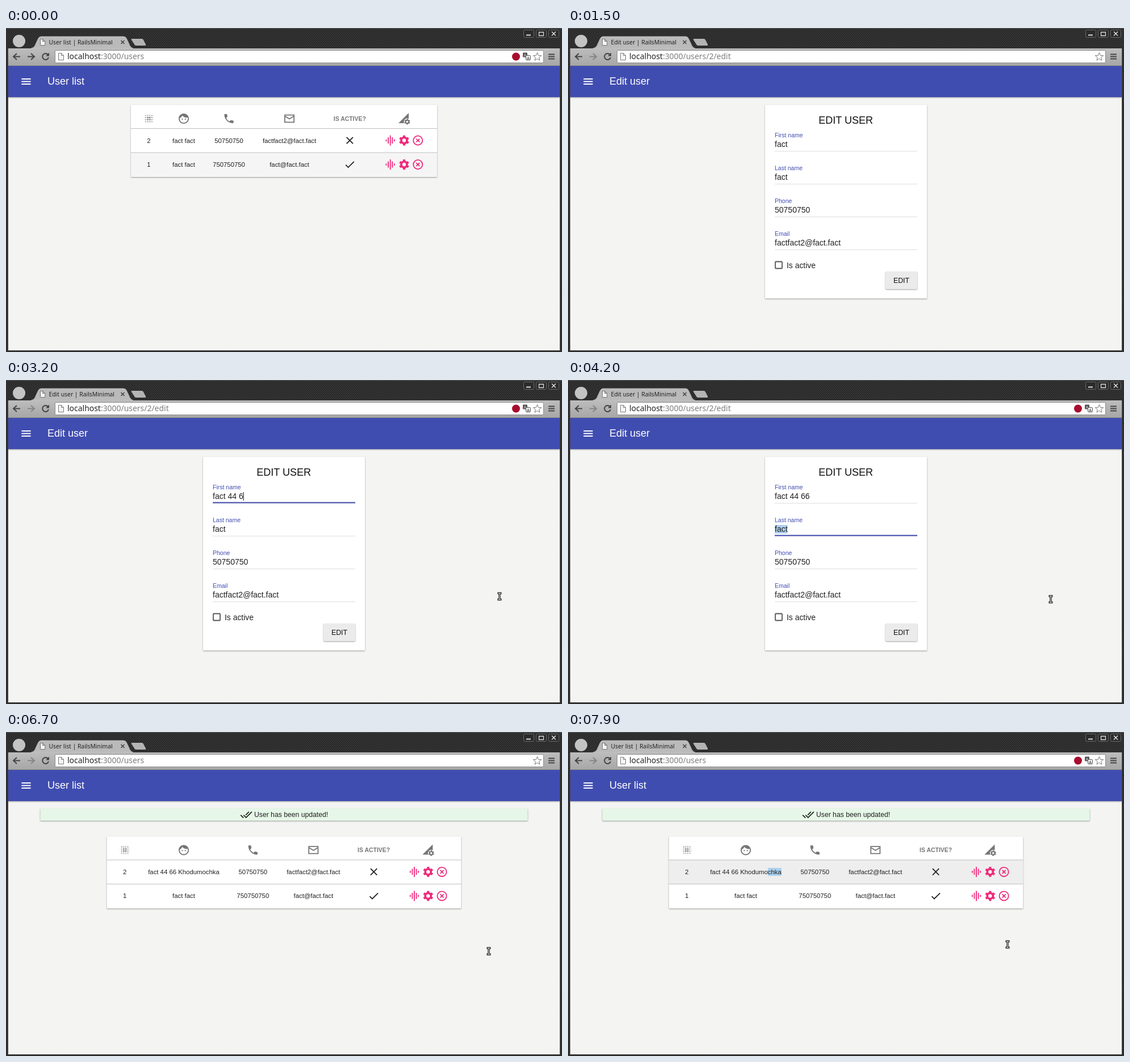
An HTML page that plays this animation: 979x572 px, repeating every 8 s.

```html
<!DOCTYPE html>
<html lang="en">
<head>
<meta charset="utf-8">
<title>User list</title>
<style>
  html, body { margin: 0; width: 100%; height: 100%; overflow: hidden; }
  svg { display: block; width: 100%; height: 100%; font-family: "Liberation Sans", Arial, sans-serif; }
  text { white-space: pre; }
  .ui { font-family: "Noto Sans", sans-serif; }
  .mid { text-anchor: middle; }
  .card { filter: drop-shadow(0 1px 1px rgba(0, 0, 0, .38)); }
</style>
</head>
<body>
<svg id="stage" viewBox="0 0 979 572"></svg>
<script>
const LOOP = 8000, STEP = 100;
const INK = '#212121', GREY = '#757575', PINK = '#ee2a7b', BLUE = '#404db0';
const FIELD_SIZE = 14, CELL_SIZE = 11.37;
const SHORT = 'fact', LAST = 'Khodumochka', EMAIL = 'factfact2@fact.fact';
const PHONES = ['50750750', '750750750'];

const stage = document.getElementById('stage');
const measure = document.createElement('canvas').getContext('2d');
const widthOf = (s, size) => {
  measure.font = `${size}px "Liberation Sans", Arial, sans-serif`;
  return measure.measureText(s).width;
};
const clamp = v => Math.max(0, Math.min(1, v));
const countBefore = (t, times) => times.filter(v => v <= t).length;

const rect = (x, y, w, h, fill, extra = '') =>
  `<rect x="${x}" y="${y}" width="${w}" height="${h}" fill="${fill}" ${extra}/>`;
const circle = (x, y, r, fill, extra = '') => `<circle cx="${x}" cy="${y}" r="${r}" fill="${fill}" ${extra}/>`;
const text = (x, y, s, size, fill = INK, extra = '') =>
  `<text x="${x}" y="${y}" font-size="${size}" fill="${fill}" ${extra}>${s}</text>`;
const centred = (x, y, s, size, fill, extra = '') => text(x, y, s, size, fill, `class="mid" ${extra}`);
const path = (d, fill = 'currentColor') => `<path d="${d}" fill="${fill}"/>`;
const line = (d, stroke, w = 1) => `<path d="${d}" fill="none" stroke="${stroke}" stroke-width="${w}"/>`;

// Icons live on a 24-unit grid
const gear = circle(12, 12, 5.6, 'none', 'stroke="currentColor" stroke-width="4.2"') +
  circle(12, 12, 8.3, 'none', 'stroke="currentColor" stroke-width="3.4" pathLength="12" stroke-dasharray="1 1" stroke-dashoffset="-.5"');

function blurDots() {
  const at = [3, 6, 10, 14, 18, 21];
  let out = '';
  at.forEach((y, j) => at.forEach((x, i) => {
    const ring = Math.max(Math.abs(i - 2.5), Math.abs(j - 2.5));
    const spread = Math.abs(i - 2.5) + Math.abs(j - 2.5);
    if (ring < 2 || spread < 3.5) out += circle(x, y, [1.5, 1, .5][ring - .5], 'currentColor');
  }));
  return out;
}

const ICONS = {
  menu: path('M3 18h18v-2H3zM3 13h18v-2H3zM3 6v2h18V6z'),
  dots: blurDots(),
  face: circle(9, 13, 1.25, 'currentColor') + circle(15, 13, 1.25, 'currentColor') +
    path('M12 2C6.48 2 2 6.48 2 12s4.48 10 10 10 10-4.48 10-10S17.52 2 12 2zm0 18c-4.41 0-8-3.59-8-8 0-.29.02-.58.05-.86 2.36-1.05 4.23-2.98 5.21-5.37C11.07 8.33 14.05 10 17.42 10c.78 0 1.53-.09 2.25-.26.21.71.33 1.47.33 2.26 0 4.41-3.59 8-8 8z'),
  phone: path('M6.6 10.8c1.4 2.8 3.8 5.1 6.6 6.6l2.2-2.2c.3-.3.7-.4 1-.2 1.1.4 2.3.6 3.6.6.6 0 1 .4 1 1V20c0 .6-.4 1-1 1C10.6 21 3 13.4 3 4c0-.6.5-1 1-1h3.5c.6 0 1 .4 1 1 0 1.2.2 2.5.6 3.6.1.3 0 .7-.3 1z'),
  mail: line('M3 5h18v14H3zM3 7l9 5.6 9-5.6', 'currentColor', 2),
  signal: path('M21 1v20H1z') + circle(18, 18, 6.5, '#fff') +
    `<g transform="translate(11.2 11.2) scale(.57)">${gear}</g>`,
  close: line('M5.7 5.7l12.6 12.6M18.3 5.7L5.7 18.3', 'currentColor', 2),
  check: line('M4.1 12.7L9 17.6 20.3 6.3', 'currentColor', 2),
  doneAll: line('M1.1 12.7L6.7 18.3M6.8 12.7l4.9 4.9L23 6.3M17.3 6.3l-6.3 6.3', 'currentColor', 2),
  bars: path('M7 18h2V6H7zM11 22h2V2h-2zM3 14h2v-4H3zM15 18h2V6h-2zM19 10v4h2v-4z'),
  gear,
  cancel: circle(12, 12, 9, 'none', 'stroke="currentColor" stroke-width="2"') +
    line('M8.7 8.7l6.6 6.6M15.3 8.7l-6.6 6.6', 'currentColor', 2),
};
const icon = (name, x, y, color = INK, scale = .9) =>
  `<g color="${color}" transform="translate(${x - 12 * scale} ${y - 12 * scale}) scale(${scale})">${ICONS[name]}</g>`;

const DEFS = `<defs>
  <pattern id="weave" width="4" height="4" patternUnits="userSpaceOnUse">
    <rect width="4" height="4" fill="#303030"/><path d="M0 0h2v1H0zM2 2h2v1H2z" fill="#222"/><path d="M0 1h2v1H0zM2 3h2v1H2z" fill="#3a3a3a"/>
  </pattern>
  <linearGradient id="bar" x2="0" y2="1"><stop stop-color="#bdbdbd"/><stop offset="1" stop-color="#a6a6a6"/></linearGradient>
  <linearGradient id="fade" gradientUnits="userSpaceOnUse" x1="165" x2="198"><stop stop-color="#333"/><stop offset="1" stop-color="#333" stop-opacity="0"/></linearGradient>
</defs>`;

const pageIcon = (x, y, h) => {
  const w = h * .75;
  return `<path d="M${x} ${y}h${w - 4}l4 4v${h - 4}h${-w}zM${x + w - 4} ${y}v4h4" fill="#f6f6f6" stroke="#777"/>`;
};

function windowFrame() {
  const buttons = [911, 933, 955].map(x =>
    rect(x + .5, 3.5, 18, 13, '#2b2b2b', 'rx="2" stroke="#6a6a6a"')).join('');
  return rect(0, 0, 979, 572, 'url(#weave)') + line('M0 .5H979', '#555') + line('M3.5 36V569.5H975.5V36', '#4a4a4a') +
    buttons + line('M916 12.5h8', '#ddd', 2) + line('M938.5 7.5h8v6h-8z', '#ddd', 1.3) +
    line('M961 6.5l7 7M968 6.5l-7 7', '#ddd', 1.6) +
    circle(23, 23, 11, '#c4c4c4') +
    '<path d="M44 36q5-1 7-5l5-11q2-5 6-5H207q4 0 6 5l5 11q2 4 6 5z" fill="#bababa" stroke="#cfcfcf" stroke-width=".6"/>' +
    '<path d="M222 19h17q2 0 3 2l4 8q1 2-2 2H229q-2 0-3-2l-5-8q-1-2 1-2z" fill="#b4b4b4"/>' +
    rect(4, 36, 971, 31, 'url(#bar)') + line('M4 66.5H975', '#8c8c8c') +
    rect(86.5, 39.5, 860, 22, '#fff', 'rx="2" stroke="#8a8a8a"') + pageIcon(92.5, 44.5, 12);
}

function browserControls(t, url, loading, editing) {
  const arrow = (x, dir, color) =>
    line(`M${x - 6 * dir} 50.5H${x + 5 * dir}M${x} 45l${6 * dir} 5.5l${-6 * dir} 5.5`, color, 2);
  const title = loading ? 'localhost:3000' + url.slice(0, 10) : `${editing ? 'Edit user' : 'User list'} | RailsMinimal`;
  const badges = t < 1100 ? 2 : t < 1700 ? 0 : t < 1900 ? 1 : t < 6600 ? 2 : t < 6800 ? 0 : t < 7300 ? 1 : 2;
  let out = arrow(19, -1, '#444') + arrow(44, 1, t < 1100 ? '#444' : '#858585');
  out += loading
    ? line('M64.5 45.5l10 10M74.5 45.5l-10 10', '#444', 2.2) + line('M60 25a5 5 0 0 1 9-3', '#aaa', 1.5)
    : line('M74 47a5.5 5.5 0 1 0 1 5', '#444', 2) + path('M76 43.5v6h-6z', '#444') + pageIcon(60.5, 19.5, 11);
  out += text(75.5, 28.5, title, 10.35, loading ? 'url(#fade)' : '#222', 'class="ui"') +
    line('M202.5 22l6 6M208.5 22l-6 6', '#444', 1.5) +
    text(108, 55, `localhost<tspan fill="#7d7d7d">:3000${url}</tspan>`, 13.95, '#222', 'class="ui"');
  if (badges) out += circle(badges > 1 ? 898 : 916, 50.5, 7, '#a80d2e');
  if (badges > 1) {
    out += rect(910, 43.5, 8, 8, '#555', 'rx="1"') + rect(915.5, 48.5, 8, 8, '#eee', 'rx="1" stroke="#555"') +
      text(912, 50, 'x', 7, '#fff') + text(917, 55.5, 'A', 7.5, '#333');
  }
  const star = Array.from({ length: 10 }, (_, i) => {
    const r = i % 2 ? 3.3 : 7.6, a = i * Math.PI / 5;
    return `${(935.5 + r * Math.sin(a)).toFixed(1)},${(51 - r * Math.cos(a)).toFixed(1)}`;
  }).join(' ');
  return out + `<polygon points="${star}" fill="#fff" stroke="#777"/>` +
    line('M955 46.5h11M955 50.5h11M955 54.5h11', '#444', 2);
}

function appBar(title) {
  return rect(4, 67, 971, 55, BLUE, 'class="card"') + icon('menu', 35.5, 94.5, '#fff') +
    text(73, 100, title, 18, '#fff');
}

// grow widens the name column on both sides, drop moves the table down
function userTable(grow, drop, rows, hover, selected = 0) {
  const cols = [251.5 - grow, 313, 392.5 + grow, 499 + grow, 605.3 + grow, 701 + grow];
  const left = 220 - grow, width = 539 + 2 * grow;
  let out = rect(left, 136, width, 127, '#fff', 'class="card"');
  ['dots', 'face', 'phone', 'mail'].forEach((name, i) => out += icon(name, cols[i], 160, GREY));
  out += centred(cols[4], 163.5, 'IS ACTIVE?', 10.43, GREY, 'font-weight="bold"') + icon('signal', cols[5], 160, GREY);
  rows.forEach((row, i) => {
    const y = 198.5 + 42.5 * i;
    out += rect(left, y - 21, width, i ? 43 : 42, '#eee', `opacity="${hover[i]}"`) +
      line(`M${left} ${y - 21}h${width}`, '#bdbdbd');
    if (!i && selected) {
      const w = widthOf(row[1].slice(-selected), CELL_SIZE);
      out += rect(313 + widthOf(row[1], CELL_SIZE) / 2 - w, y - 7, w, 14, '#abd0ee');
    }
    row.forEach((cell, c) => out += centred(cols[c], y + 4, cell, CELL_SIZE));
    out += icon(i ? 'check' : 'close', cols[4], y);
    ['bars', 'gear', 'cancel'].forEach((name, k) => out += icon(name, cols[5] + (k - 1) * 24.3, y, PINK));
  });
  return `<g transform="translate(0 ${drop})">${out}</g>`;
}

function listPage(t, updated) {
  const name = updated ? `${SHORT} 44 66 ${LAST}` : `${SHORT} ${SHORT}`;
  const rows = [
    [2, name, PHONES[0], EMAIL],
    [1, `${SHORT} ${SHORT}`, PHONES[1], `${SHORT}@${SHORT}.${SHORT}`],
  ];
  if (!updated) return userTable(0, 0, rows, [clamp((t - 100) / 300), .6 * clamp(1 - t / 300)]);
  return rect(60.5, 135, 858, 21.5, '#e6f7e7', 'class="card"') + icon('doneAll', 423, 146) +
    text(437, 150, 'User has been updated!', 12.2) +
    userTable(42.3, 48.4, rows, [clamp((t - 7300) / 300), 0], t >= 7900 ? 4 : 0);
}

function field(index, label, value, focus = 0, selected = 0, caret = false) {
  const y = 58 * index, end = 364 + widthOf(value, FIELD_SIZE);
  let out = text(364, 193 + y, label, 10.5, BLUE);
  if (selected) out += rect(364, 198 + y, widthOf(value.slice(0, selected), FIELD_SIZE), 15, '#abd0ee');
  out += text(364, 210 + y, value, FIELD_SIZE) + rect(364, 217 + y, 251, 1, '#dedede');
  if (focus) out += rect(489.5 - 125.5 * focus, 215.5 + y, 251 * focus, 2, BLUE);
  if (caret) out += rect(end, 198 + y, 1, 15, '#111');
  return out;
}

function editPage(t) {
  const first = SHORT + ' 44 66'.slice(0, countBefore(t, [2500, 2700, 2900, 3000, 3100, 3300]));
  const last = t < 4600 ? SHORT
    : LAST.slice(0, countBefore(t, [4600, 5000, 5500, 5600, 5700, 5800, 5900, 6100, 6200, 6400, 6500]));
  const selected = t < 4100 || t >= 4600 ? 0 : t < 4200 ? 2 : 4;
  const onFirst = t >= 2000 && t < 3700, onLast = t >= 3700;
  return rect(347, 136, 285, 341.5, '#fff', 'class="card"') + centred(489.2, 168.5, 'EDIT USER', 18, '#111') +
    field(0, 'First name', first, onFirst ? clamp((t - 1900) / 200) : 0, 0, onFirst) +
    field(1, 'Last name', last, onLast ? clamp((t - 3600) / 200) : 0, selected, onLast && !selected) +
    field(2, 'Phone', PHONES[0]) + field(3, 'Email', EMAIL) +
    (t >= 4600 && t < 4900 ? rect(364.5, 277.5, 250, 20, '#fff', 'stroke="#bbb"') : '') +
    rect(365, 412.5, 12, 12, 'none', 'stroke="#555" stroke-width="1.8" rx="1"') +
    text(385, 423.5, 'Is active', 13.9) +
    rect(559, 430, 56, 31, '#ebebeb', 'rx="2" class="card"') + centred(587, 449.5, 'EDIT', 12.4, '#111');
}

const POINTER = [[2000, 846, 350], [2100, 838, 333], [2400, 838, 333], [2800, 909, 374], [3300, 859, 384],
  [3400, 859, 384], [3700, 850, 387], [7200, 850, 387], [7500, 835, 391], [7700, 819, 382], [7800, 819, 382], [7900, 774, 375]];

function pointer(t) {
  if (t < POINTER[0][0]) return '';
  const n = countBefore(t, POINTER.map(p => p[0])) - 1;
  const a = POINTER[n], b = POINTER[n + 1] || a;
  const k = b === a ? 0 : (t - a[0]) / (b[0] - a[0]);
  const x = a[1] + (b[1] - a[1]) * k, y = a[2] + (b[2] - a[2]) * k;
  const outline = line(`M${x - 3.5} ${y - 5.5}h7m-3.5 0v11m-3.5 0h7`, '#1a1a1a', 3.4);
  return outline + line(`M${x - 2.5} ${y - 5.5}h5m-2.5 0v11m-2.5 0h5`, '#eee', 1.1);
}

function statusBar(t) {
  if (t >= 1500) return '';
  return `<g opacity="${clamp((t - 200) / 300)}"><path d="M4 548H324q3 0 3 3v18H4z" fill="#dbdbdb"/>` +
    text(7, 562, 'localhost:3000/users/2/edit', 10.3, '#666', 'class="ui"') + '</g>';
}

function scene(t) {
  const editing = t >= 1500 && t < 6700;
  const loading = (t >= 1100 && t < 1500) || (t >= 6600 && t < 6700);
  const url = t >= 1100 && t < 6700 ? '/users/2/edit' : '/users';
  return DEFS + windowFrame() + browserControls(t, url, loading, editing) +
    rect(4, 67, 971, 502, '#f4f4f3') + appBar(editing ? 'Edit user' : 'User list') +
    (editing ? editPage(t) : listPage(t, t >= 6700)) + statusBar(t) + pointer(t);
}

let shown = -1;
function tick() {
  const t = Math.floor(performance.now() % LOOP / STEP) * STEP;
  if (t !== shown) stage.innerHTML = scene(shown = t);
  requestAnimationFrame(tick);
}
tick();
</script>
</body>
</html>
```
